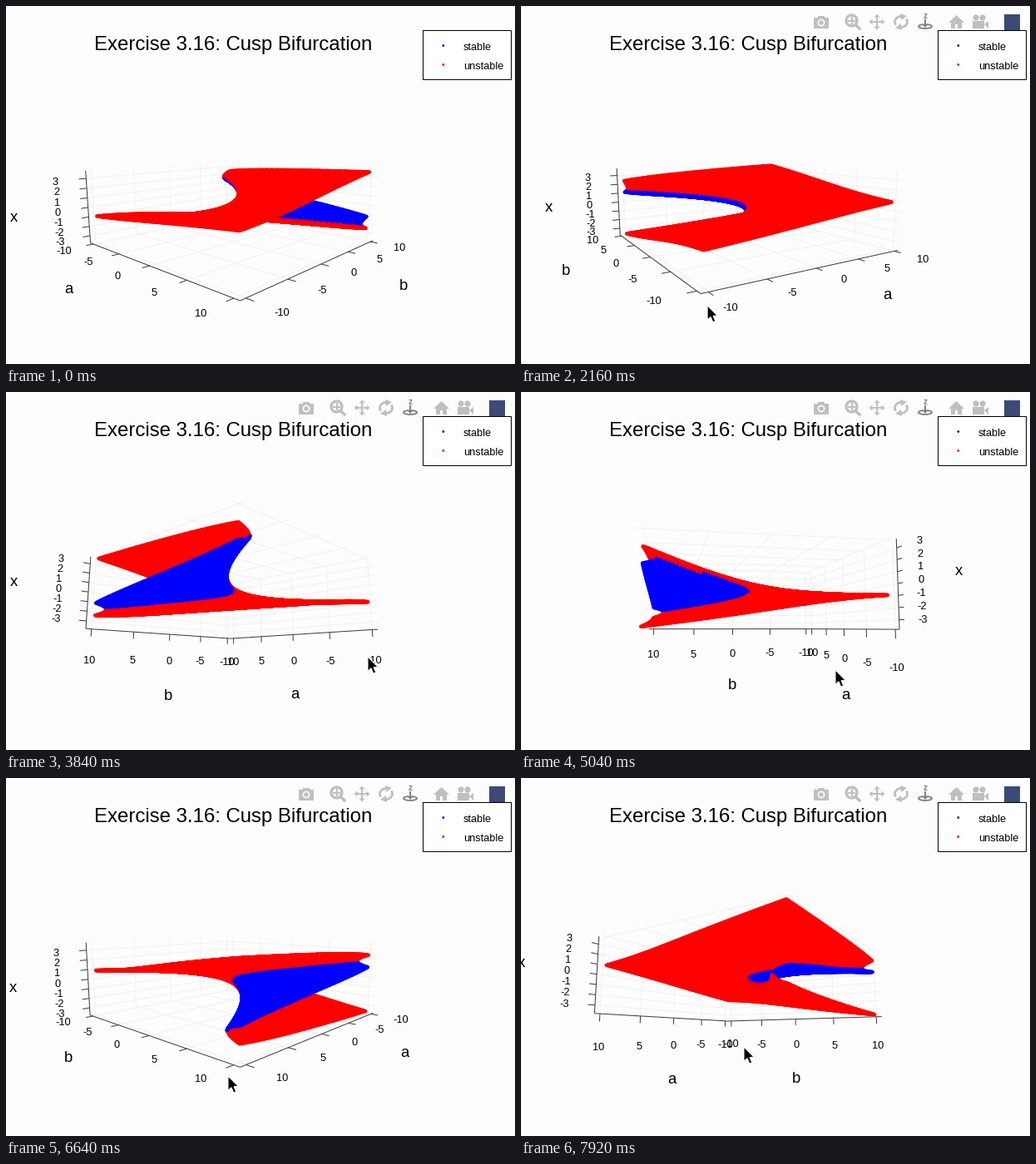
A matplotlib script that plays this animation: 612x430 px, repeating every 8000 ms.

```python
import numpy as np
import matplotlib.pyplot as plt
from matplotlib.animation import FuncAnimation
from matplotlib.collections import LineCollection, PolyCollection
from matplotlib.patches import Arc, Circle, Polygon, Rectangle

W, H, DPI = 612, 430, 100
PX = 72 / DPI                       # points per pixel
STEP, FRAMES = 80, 100
HOVER = 720                         # pointer enters the plot

plt.rcParams["font.family"] = "Liberation Sans"
RED, BLUE, INK, GREY = "#ff0000", "#0000ff", "#3c3c3c", "#bdbfc2"

# camera
CENTER = np.array([273.2, 241.0])
FOCAL, DIST, SCALE = 470, 2.71, 0.0664
HALF = np.array([10.6, 10.6, 3.79])
TICKS = [np.arange(-10, 11, 5), np.arange(-10, 11, 5), np.arange(3, -4, -1)]
TICK_LEN, LABEL_GAP, TITLE_GAP = 0.05, 0.205, 0.47

# time, azimuth, elevation, pointer x, pointer y
KEYS = np.array([
    (0, -46.8, 10.4, 340, 382),
    (720, -46.8, 10.4, 340, 382),
    (880, -46.8, 10.4, 393, 361),
    (1440, -72, 9.3, 447, 359),
    (1800, -117, 9, 539, 357),
    (2120, -119, 9, 217, 360),
    (2960, -189, 5.7, 366, 354),
    (3840, -226.5, -10.4, 435, 318),
    (5040, -191, -5.2, 378, 334),
    (5520, -249, 0.6, 499, 345),
    (5840, -251, 0.6, 127, 342),
    (6640, -316.8, 8.7, 267, 358),
    (7920, -326, -8.6, 268, 323),
])


def pose(t):
    return [np.interp(t, KEYS[:, 0], KEYS[:, k]) for k in range(1, 5)]


class Camera:
    def __init__(self, azim, elev):
        a, e = np.radians([azim, elev])
        self.eye = np.array([np.cos(a) * np.cos(e), np.sin(a) * np.cos(e), np.sin(e)])
        self.right = np.array([-np.sin(a), np.cos(a), 0])
        self.up = np.cross(self.eye, self.right)

    def depth(self, p):
        return DIST - p @ self.eye * SCALE

    def project(self, p):
        p = np.asarray(p, float)
        k = FOCAL * SCALE / self.depth(p)
        return np.stack([CENTER[0] + p @ self.right * k,
                         CENTER[1] - p @ self.up * k], axis=-1)


def corner(i):
    return np.array([HALF[k] if i >> k & 1 else -HALF[k] for k in range(3)])


CORNERS = np.array([corner(i) for i in range(8)])


def pick_edges(cam):
    """Choose the box edge that carries each axis."""
    near = sum(1 << k for k in range(3) if cam.eye[k] > 0)
    far = near ^ 7
    pts = cam.project(CORNERS)
    low = max((i for i in range(8) if i not in (near, far)), key=lambda i: pts[i, 1])
    nbrs = [low ^ 1 << k for k in range(3)]
    nbrs = sorted((i for i in nbrs if i not in (near, far)), key=lambda i: pts[i, 0])
    left, right = nbrs[0], nbrs[-1]
    pairs = [(left, low), (low, right)]
    top = right ^ 7
    if top in (near, far):
        pairs.append((right, left ^ 7))
    else:
        pairs.append((left, top))
    return {(i ^ j).bit_length() - 1: i & j for i, j in pairs}, far


def outward(cam, axis, c):
    dirs = []
    for k in range(3):
        if k != axis:
            d = np.zeros(3)
            d[k] = np.sign(CORNERS[c][k])
            dirs.append(d)
    return max(dirs, key=lambda d: d @ cam.eye) / SCALE


def grid_lines(far):
    lines = []
    for face in range(3):
        i, j = [k for k in range(3) if k != face]
        for u, v in ((i, j), (j, i)):
            for tick in TICKS[u]:
                p = np.tile(CORNERS[far], (2, 1))
                p[:, u] = tick
                p[:, v] = -HALF[v], HALF[v]
                lines.append(p)
    return np.array(lines)


def sheet_bounds(b):
    """Limits in x of the middle and the upper sheet where |a| <= 10."""
    hi = max(r.real for r in np.roots([1, 0, -b, -10]) if abs(r.imag) < 1e-9)
    fold = np.sqrt(max(b, 0) / 3)
    if 2 * fold ** 3 <= 10:
        return fold, fold, hi
    _, inner, outer = np.sort(np.roots([1, 0, -b, 10]).real)
    return inner, outer, hi


def cells(b, x):
    b = np.broadcast_to(b[:, None], x.shape)
    g = np.stack([x ** 3 - b * x, b, x], axis=-1)
    quads = np.stack([g[:-1, :-1], g[:-1, 1:], g[1:, 1:], g[1:, :-1]], axis=2)
    return quads.reshape(-1, 4, 3)


def surface():
    """The three sheets of a = x^3 - b x."""
    b = np.linspace(-10, 10, 65)
    inner, outer, hi = np.array([sheet_bounds(v) for v in b]).T
    upper = np.linspace(outer, hi, 26, axis=1)
    middle = np.linspace(-inner, inner, 31, axis=1)
    folded = b >= 0
    red = np.concatenate([cells(b, upper), cells(b, -upper)])
    blue = cells(b[folded], middle[folded])
    rgba = np.array([(1, 0, 0, 1)] * len(red) + [(0, 0, 1, 1)] * len(blue), float)
    quads = np.concatenate([red, blue])
    return quads, quads.mean(axis=1), rgba


CELLS, MIDS, RGBA = surface()

fig = plt.figure(figsize=(W / DPI, H / DPI), dpi=DPI, facecolor="#fdfdfd")
ax = fig.add_axes([0, 0, 1, 1])
ax.set_xlim(0, W)
ax.set_ylim(H, 0)
ax.axis("off")


def label(s, size, x=0, y=0, **kw):
    kw = {"ha": "center", "va": "baseline", "color": "black", **kw}
    return ax.text(x, y, s, fontsize=size * PX, **kw)


grid = ax.add_collection(LineCollection([], colors="#f1f1f1", linewidths=PX, zorder=1))
frame = ax.add_collection(LineCollection([], colors=INK, linewidths=PX, zorder=2))
sheet = ax.add_collection(PolyCollection([], linewidths=4.5 * PX, joinstyle="round", zorder=4))
tick_text = [[label(str(v), 12.8, zorder=3) for v in ticks] for ticks in TICKS]
axis_text = [label(s, 18.5, zorder=3) for s in "abx"]

label("Exercise 3.16: Cusp Bifurcation", 24, CENTER[0], 53)

ax.add_patch(Rectangle((501, 29), 105.5, 58.5, fc="white", ec="black", lw=PX, zorder=6))
for name, color, y in (("stable", BLUE, 48), ("unstable", RED, 71)):
    ax.add_patch(Circle((525.8, y - 0.5), 1.4, fc=color, ec="none", zorder=7))
    label(name, 12.8, 550, y + 4.8, ha="left", zorder=7)


def toolbar():
    parts = []

    def fill(patch, color=GREY):
        patch.set(facecolor=color, edgecolor="none", zorder=8)
        parts.append(ax.add_patch(patch))

    def line(xs, ys, color=GREY, lw=2):
        parts.extend(ax.plot(xs, ys, color=color, lw=lw * PX, zorder=8))

    def arc(x, y, w, h, start, end, color=GREY, lw=2):
        parts.append(ax.add_patch(Arc((x, y), w, h, theta1=start, theta2=end,
                                      ec=color, lw=lw * PX, zorder=8)))

    def tri(*pts, color=GREY):
        fill(Polygon(pts), color)

    # still camera
    fill(Rectangle((352, 14), 18, 12.5))
    fill(Rectangle((357, 11.5), 8, 4))
    fill(Circle((361, 20), 4.4), "#fdfdfd")
    fill(Circle((361, 20), 2.8))
    # zoom
    arc(397.5, 17.5, 13, 13, 0, 360, lw=3.2)
    line([402, 407], [22.5, 27], lw=3.4)
    line([394, 401], [17.5, 17.5])
    line([397.5, 397.5], [14, 21])
    # pan
    line([421, 435], [19, 19])
    line([428, 428], [12, 26])
    for dx, dy in ((1, 0), (-1, 0), (0, 1), (0, -1)):
        tip = np.array([428 + 9.5 * dx, 19 + 9.5 * dy])
        back = tip - 4 * np.array([dx, dy])
        side = 3.5 * np.array([dy, dx])
        tri(tip, back + side, back - side)
    # orbit
    arc(457, 19, 15, 13, 150, 270, lw=2.8)
    arc(457, 19, 15, 13, -30, 90, lw=2.8)
    tri((456, 9), (464, 12), (457, 17))
    tri((458, 29), (450, 26), (457, 21))
    # turntable, active
    dark = "#7d8085"
    parts.append(label("z", 10, 486, 15, color=dark, weight="bold", zorder=8))
    line([486, 486], [16.5, 24], dark)
    arc(486, 24.5, 16, 5, -60, 240, dark, 1.8)
    tri((482.5, 22), (489.5, 22), (486, 26), color=dark)
    # home
    tri((514, 20), (523.5, 11), (533, 20))
    fill(Rectangle((517, 19), 4.7, 8))
    fill(Rectangle((525.3, 19), 4.7, 8))
    fill(Rectangle((517, 18), 13, 3.5))
    # film camera
    fill(Circle((547, 14), 3.6))
    fill(Circle((555, 14), 3.6))
    fill(Rectangle((543, 18), 14, 9))
    tri((557, 22), (562, 18), (562, 27))
    # badge
    fill(Rectangle((581, 9.5), 19, 19), "#3d4a75")
    return parts


ARROW = 1.08 * np.array([(0, 0), (0, 16), (3.7, 12.7), (6.2, 18.6), (9, 17.4),
                         (6.5, 11.6), (11.3, 11.4)])
tools = toolbar()
pointer = ax.add_patch(Polygon(ARROW, fc="black", ec="white", lw=PX, zorder=10))


def update(i):
    t = i * STEP
    azim, elev, px, py = pose(t)
    cam = Camera(azim, elev)
    edges, far = pick_edges(cam)

    grid.set_segments(cam.project(grid_lines(far)))

    lines = []
    for axis, c in edges.items():
        out = outward(cam, axis, c)
        ends = CORNERS[[c, c | 1 << axis]]
        lines.append(ends)
        for v, text in zip(TICKS[axis], tick_text[axis]):
            p = CORNERS[c].copy()
            p[axis] = v
            lines.append(np.array([p, p + TICK_LEN * out]))
            x, y = cam.project(p + LABEL_GAP * out)
            text.set_position((x, y + 4.6))
        x, y = cam.project(ends.mean(axis=0) + TITLE_GAP * out)
        axis_text[axis].set_position((x, y + (6.2 if axis == 1 else 4.8)))
    frame.set_segments(cam.project(np.array(lines)))

    order = np.argsort(-cam.depth(MIDS))
    sheet.set_verts(cam.project(CELLS[order]))
    sheet.set_facecolor(RGBA[order])
    sheet.set_edgecolor(RGBA[order])

    shown = t >= HOVER
    for part in tools:
        part.set_visible(shown)
        part.set_alpha(min(1, max(0, (t - HOVER + STEP) / 320)))
    pointer.set_visible(shown)
    pointer.set_xy(ARROW + (px, py))
    return []


anim = FuncAnimation(fig, update, frames=FRAMES, init_func=lambda: update(0),
                     interval=STEP, repeat=True, repeat_delay=0, blit=False)
plt.show()
```
